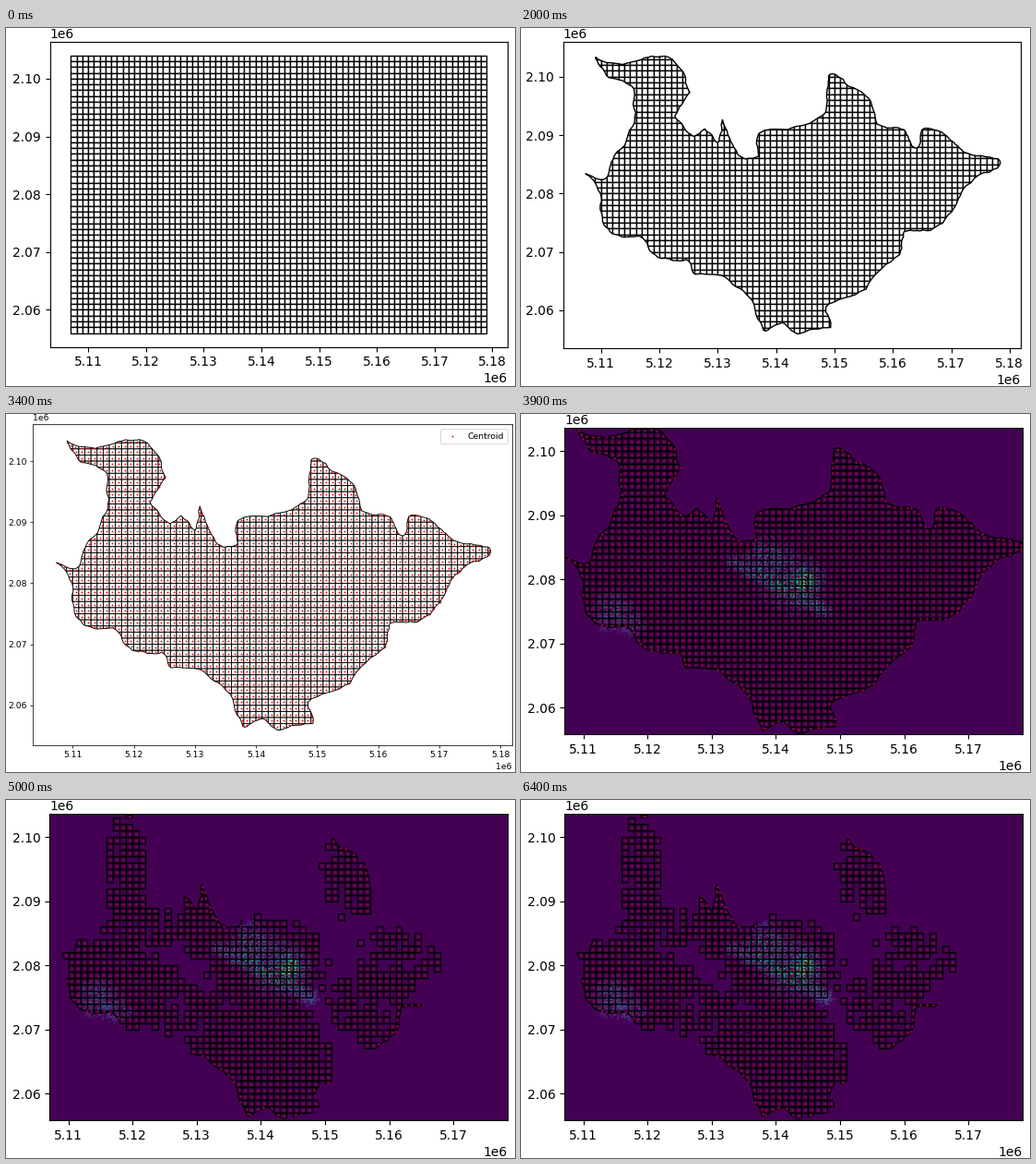
Write a matplotlib script that moves like this. It is 552 by 388 pixels and loops after 6.5 s.

```python
import matplotlib.pyplot as plt
import numpy as np
from matplotlib.animation import FuncAnimation
from matplotlib.collections import PolyCollection
from matplotlib.patches import PathPatch
from matplotlib.path import Path
from matplotlib.ticker import MultipleLocator

W, H, DPI = 552, 388, 100
COLS, ROWS = 72, 48
X0, Y0, KM = 5107e3, 2104e3, 1000
FRAMES, INTERVAL, SCENES = 65, 100, 7
DIM_RED = (.5, .02, .26)

plt.rcParams["font.family"] = "DejaVu Sans"
rng = np.random.default_rng(4)

# Key points of the region border in sketch units, clockwise from the north-west.
BORDER = [
    (83, 34), (112, 42), (143, 33), (161, 34), (184, 72), (168, 97), (188, 119),
    (200, 111), (214, 126), (219, 101), (230, 128), (243, 143), (258, 139),
    (258, 116), (319, 101), (331, 84), (333, 54), (341, 53), (372, 75),
    (385, 106), (414, 112), (423, 130), (430, 129), (433, 112), (460, 119),
    (478, 136), (514, 143), (514, 153), (477, 176), (465, 200), (442, 220),
    (414, 221), (409, 246), (373, 283), (330, 302), (335, 324), (300, 331),
    (283, 319), (263, 327), (247, 291), (222, 270), (190, 267), (180, 251),
    (150, 249), (130, 226), (112, 227), (92, 214), (88, 180), (72, 159),
    (94, 164), (103, 140), (125, 103), (124, 68), (97, 56),
]

# Settled areas: column, row, radius x, radius y, share of cells kept.
SETTLED = [
    (33, 23.5, 10.5, 8, .98), (32, 39, 12, 12, .98), (9, 26.5, 11.5, 8, .92),
    (20, 30, 7, 4.5, .8), (11.5, 9.5, 3.5, 10, .85), (14, 18, 8, 4, .7),
    (23.5, 16, 4, 8, 1), (46, 9.5, 4.5, 7.5, .75), (50, 30, 7.5, 7, .65),
    (53, 23, 8, 6, .55),
]

# Population clusters: column, row, spread, peak.
CLUSTERS = [(37.8, 24.2, 1.3, .6), (35.5, 24.5, 2.8, .3), (31.5, 20.5, 2, .3),
            (7.5, 28.8, 1.9, .3), (11, 31, 1.2, .2)]
ROAD = np.linspace((26, 21), (41, 29), 16)


def roughen(points, rounds=3, bend=.04, jitter=.05):
    """Subdivide a closed line with slightly rounded, irregular bends."""
    for _ in range(rounds):
        before, after, beyond = (np.roll(points, k, axis=0) for k in (1, -1, -2))
        step = after - points
        normal = np.column_stack([-step[:, 1], step[:, 0]])
        middle = (points + after) / 2 + bend * (points + after - before - beyond)
        middle += normal * rng.uniform(-2, 2, (len(points), 1)) * jitter
        points = np.stack([points, middle], axis=1).reshape(-1, 2)
    return points


def square(col, row):
    x, y = X0 + col * KM, Y0 - row * KM
    return [(x, y), (x + KM, y), (x + KM, y - KM), (x, y - KM)]


def region_cells():
    """Centroid of the part of each cell inside the region."""
    sub = (np.arange(5) + .5) / 5
    dx, dy = (a.ravel() * KM for a in np.meshgrid(sub, sub))
    centres = {}
    for row in range(ROWS):
        for col in range(COLS):
            pts = np.column_stack([X0 + col * KM + dx, Y0 - row * KM - dy])
            inside = region.contains_points(pts)
            if inside.any():
                centres[col, row] = pts[inside].mean(axis=0)
    return centres


def is_settled(col, row):
    chance = max(share * np.clip(4 - 4 * np.hypot((col - c) / rx, (row - r) / ry), 0, 1)
                 for c, r, rx, ry, share in SETTLED)
    return rng.random() < chance


def population():
    x, y = np.meshgrid(np.arange(.1, 71.4, .25), np.arange(.4, 48.1, .25))
    spots = CLUSTERS + [(c, r, .8, .15) for c, r in ROAD]
    total = sum(peak * np.exp(-((x - c) ** 2 + (y - r) ** 2) / (2 * spread ** 2))
                for c, r, spread, peak in spots)
    total *= rng.uniform(.3, 1.2, x.shape) * (rng.random(x.shape) < .85)
    return np.where(total < .05, 0, total)


def make_axes(left, top, right, bottom, xlim, ylim, scale=1.0):
    ax = fig.add_axes([left / W, 1 - bottom / H, (right - left) / W, (bottom - top) / H])
    ax.set(xlim=np.array(xlim) * KM, ylim=np.array(ylim) * KM)
    for axis in (ax.xaxis, ax.yaxis):
        axis.set_major_locator(MultipleLocator(10 * KM))
        axis.get_offset_text().set_fontsize(10 * scale)
    ax.tick_params(labelsize=10 * scale, length=3.5 * scale, pad=3.5 * scale,
                   width=.8 * scale)
    for spine in ax.spines.values():
        spine.set_linewidth(.8 * scale)
        spine.set_zorder(6)
    return ax


def add_cells(ax, cells, face="white", lw=1.0, clipped=True, snap=None):
    grid = PolyCollection([square(*c) for c in cells], facecolors=face,
                          edgecolors="black", linewidths=lw, zorder=2, snap=snap)
    ax.add_collection(grid, autolim=False)
    if clipped:
        grid.set_clip_path(region, ax.transData)
    return grid


def add_region(ax, face="none", edge="black", lw=1.0):
    return ax.add_patch(PathPatch(region, facecolor=face, edgecolor=edge,
                                  linewidth=lw, zorder=3))


def add_dots(ax, cells, color, scale=1.0, **kw):
    xy = np.array([centroids[c] for c in cells])
    return ax.scatter(*xy.T, s=scale ** 2, linewidths=scale, color=color,
                      zorder=4, **kw)


sketch = roughen(np.array(BORDER, float))
border = (sketch - (70, 30)) / 6.26 * (KM, -KM) + (X0, Y0)
region = Path(np.vstack([border, border[:1]]), closed=True)
centroids = region_cells()
inside_cells = list(centroids)
kept_cells = [cell for cell in inside_cells if is_settled(*cell)]

fig = plt.figure(figsize=(W / DPI, H / DPI), dpi=DPI, facecolor="white")

# Full grid, then the region over it
grid_ax = make_axes(47.75, 14.88, 543.75, 345.55, (5103.4, 5182.6), (2053.6, 2106.4))
add_cells(grid_ax, [(c, r) for r in range(ROWS) for c in range(COLS)], clipped=False)
red_region = add_region(grid_ax, "red", "red")

# Grid cut to the region
VIEW = (5103.52, 5181.88), (2053.5, 2106.0)
clip_ax = make_axes(45.75, 14.8, 541.75, 346.9, *VIEW)
add_cells(clip_ax, inside_cells)
add_region(clip_ax)

# Centroids
SMALL = .67
dots_ax = make_axes(29.4, 11.4, 548.6, 358.8, *VIEW, scale=SMALL)
add_cells(dots_ax, inside_cells, lw=SMALL, snap=False)
add_region(dots_ax, lw=SMALL)
add_dots(dots_ax, inside_cells, "red", SMALL, label="Centroid")
legend = dots_ax.legend(loc="upper right", fontsize=10 * SMALL)
legend.get_frame().set_linewidth(SMALL)
legend.set_zorder(7)

# Population raster with all cells, then only the settled ones
raster_ax = make_axes(47, 15, 544, 347, (5107.05, 5178.45), (2055.85, 2103.6))
raster_ax.imshow(population(), cmap="viridis", vmin=0, vmax=1, aspect="auto",
                 interpolation="nearest", zorder=1,
                 extent=(*raster_ax.get_xlim(), *raster_ax.get_ylim()))


def add_layer(cells):
    return [add_cells(raster_ax, cells, "none"), add_region(raster_ax),
            add_dots(raster_ax, cells, DIM_RED)]


all_layer, kept_layer = add_layer(inside_cells), add_layer(kept_cells)
kept_area = Path.make_compound_path(
    *[Path(square(*c) + square(*c)[:1], closed=True) for c in kept_cells])
kept_layer[1].set_clip_path(kept_area, raster_ax.transData)


def draw(frame):
    scene = frame * SCENES // FRAMES
    grid_ax.set_visible(scene < 2)
    red_region.set_visible(scene == 1)
    clip_ax.set_visible(scene == 2)
    dots_ax.set_visible(scene == 3)
    raster_ax.set_visible(scene >= 4)
    for artist in all_layer:
        artist.set_visible(scene == 4)
    for artist in kept_layer:
        artist.set_visible(scene >= 5)
    return []


anim = FuncAnimation(fig, draw, frames=FRAMES, interval=INTERVAL,
                     init_func=lambda: draw(0), repeat=True, repeat_delay=0)
plt.show()
```
